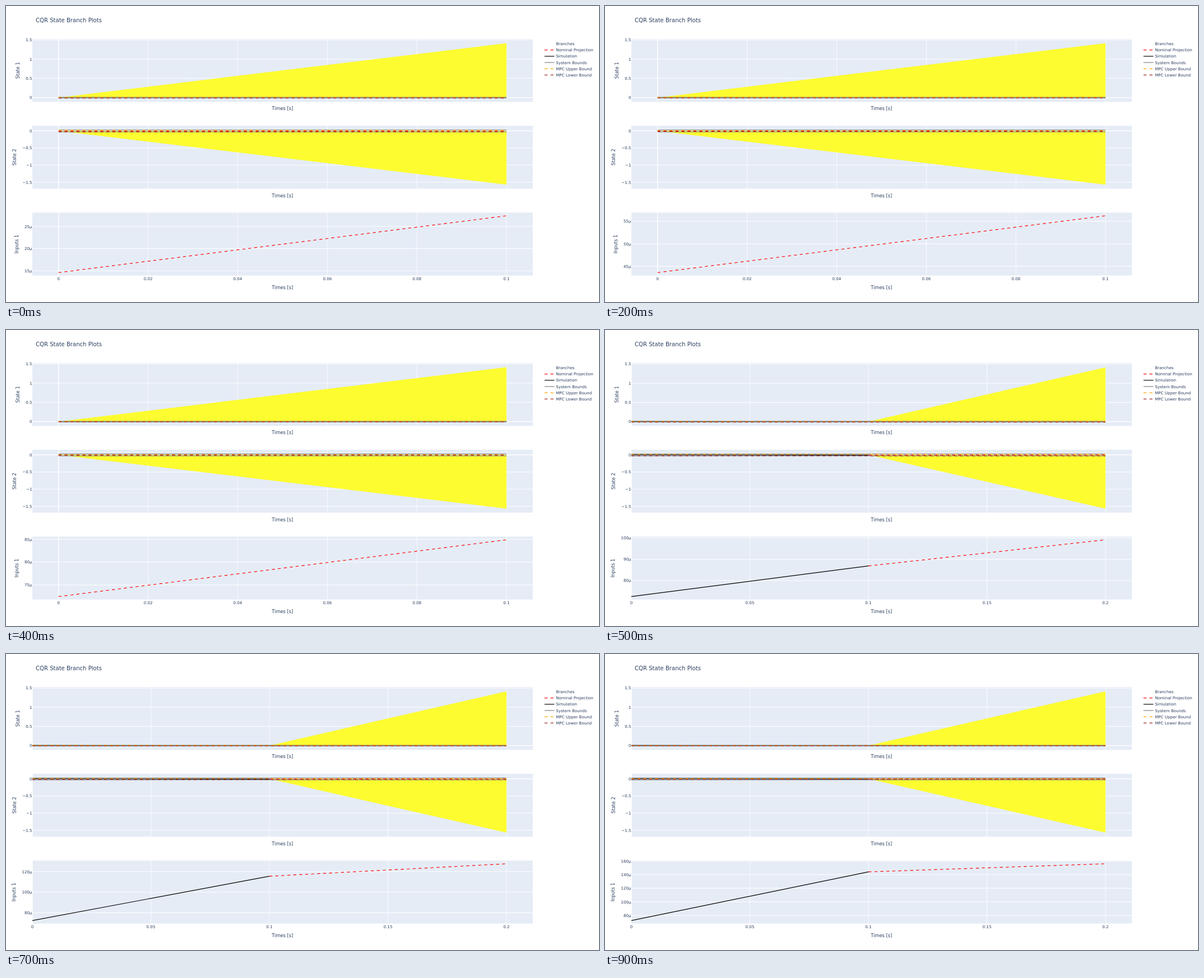
These frames come from a looping animation (1058 by 529 pixels, 1000 ms). An HTML page:

```html
<!DOCTYPE html>
<html lang="en">
<head>
<meta charset="utf-8">
<style>
html, body { margin: 0; height: 100%; overflow: hidden; background: #fff; }
svg { display: block; width: 1058px; height: 529px; }
text { font: 7.1px "DejaVu Sans", Verdana, sans-serif; fill: #2a3f5f; }
.axis { font-size: 8.29px; }
.title { font-size: 10.07px; }
</style>
</head>
<body>
<svg id="stage" viewBox="0 0 1058 529"></svg>
<script>
const stage = document.getElementById('stage');
const LEFT = 47, RIGHT = 940, END = 893;
const COLORS = { nominal: 'red', sim: 'black', system: 'gray', upper: 'orange', lower: 'brown' };

const line = (x1, y1, x2, y2, color, dashed, width = 1.18) =>
  `<path d="M${x1} ${y1}L${x2} ${y2}" stroke="${color}" stroke-width="${width}"` +
  `${dashed ? ' stroke-dasharray="5.33"' : ''}/>`;
const text = (x, y, s, anchor = 'start', cls = '', extra = '') =>
  `<text x="${x}" y="${y}" text-anchor="${anchor}" class="${cls}" ${extra}>${s}</text>`;
const label = n => String(n).replace('-', '−');

function panel(top, name, nameX, xTicks, yTicks, suffix = '') {
  const mid = top + 56.2;
  let out = `<rect x="${LEFT}" y="${top}" width="${RIGHT - LEFT}" height="112.4" fill="#e5ecf6"/>`;
  for (const [v, x] of xTicks)
    out += line(x, top, x, top + 112.4, '#fff', false, v ? 0.8 : 1.4);
  for (const [v, y] of yTicks) {
    out += line(LEFT, y, RIGHT, y, '#fff', false, v ? 1 : 1.4);
    out += text(46.5, y + 2.6, label(v) + suffix, 'end');
  }
  const x = nameX + 3;
  return out + text(x, mid, name, 'middle', 'axis', `transform="rotate(-90 ${x} ${mid})"`);
}

function bounds(x0, start, zero, system, mpc, drift) {
  const flat = (x, dy, color, dashed) => line(x, zero + dy, END, zero + dy, color, dashed);
  let out = line(start, zero + drift, END, zero + drift - 0.4, COLORS.nominal, true);
  if (start > x0) out += line(x0, zero - 0.3, start, zero + drift, COLORS.sim);
  return out + flat(x0, -system, COLORS.system) + flat(x0, system + 0.1, COLORS.system) +
    flat(x0, -mpc, COLORS.upper, true) + flat(x0, mpc + 0.2, COLORS.lower, true);
}

function legend() {
  const items = [['Branches'], ['Nominal Projection', 'nominal', true], ['Simulation', 'sim'],
    ['System Bounds', 'system'], ['MPC Upper Bound', 'upper', true], ['MPC Lower Bound', 'lower', true]];
  return items.map(([name, key, dashed], i) => {
    const y = 67.4 + i * 11.2;
    return (key ? line(960.8, y, 978.4, y, COLORS[key], dashed) : '') + text(981.2, y + 2.6, name);
  }).join('');
}

// Input value in µ at the start of the projection
const input = n => 14.6 + 14.54 * n - 0.0175 * n * n;

function draw(n) {
  const second = n >= 5, phase = n % 5;
  const x0 = second ? LEFT : 93.8;
  const start = second ? 470 : x0;
  const ticks = second ? [0, 0.05, 0.1, 0.15, 0.2] : [0, 0.02, 0.04, 0.06, 0.08, 0.1];
  const xTicks = ticks.map((v, i) => [v, x0 + (END - x0) * i / (ticks.length - 1)]);
  const shift = second ? 0.3 : 0;
  const y1 = v => 163.7 - v * (68.8 - shift / 1.5);
  const y2 = v => 223.2 - v * 61.2;

  const from = input(n), to = from + 12.8 - 0.1 * n;
  const low = second ? input(4) : from;
  const y3 = v => 476.4 - (v - low) / (to - low) * 101.5;
  const rough = (to - low) * 1.11 / 5;
  const step = [5, 10, 20].find(s => s >= rough);
  const yTicks = [];
  for (let v = Math.ceil(low / step) * step; y3(v) > 369.5; v += step) yTicks.push([v, y3(v)]);

  const branches = (zero, end) => `<path d="M${start} ${zero}L${END} ${end}V${zero}Z" fill="#fcfc30"/>`;
  const tight = phase / 4;
  let out = text(53, 29.3, 'CQR State Branch Plots', 'start', 'title') + legend();

  out += panel(59, 'State 1', 21, xTicks, [0, 0.5, 1, 1.5].map(v => [v, y1(v)]));
  out += branches(y1(0), 66.5 + shift) + bounds(x0, start, y1(0), 0.6, 0.7 - 0.4 * tight, 0.4);

  out += panel(214, 'State 2', 15, xTicks, [0, -0.5, -1, -1.5].map(v => [v, y2(v)]));
  out += branches(y2(0), 319.3) + bounds(x0, start, y2(0), 1.6, 1.4 - 0.9 * tight, 0.4);

  out += panel(369.3, 'Inputs 1', second ? 14.3 : 19, xTicks, yTicks, 'μ');
  if (second) out += line(x0, y3(low), start, y3(from), COLORS.sim);
  out += line(start, y3(from), END, y3(to), COLORS.nominal, true);

  for (const y of [186.3, 341.5, 505.7]) out += text(493.3, y, 'Times [s]', 'middle', 'axis');
  for (const [v, x] of xTicks) out += text(x, 489.8, v, 'middle');
  stage.innerHTML = out;
}

let shown = -1;
const begin = performance.now();
function tick() {
  const n = Math.floor((performance.now() - begin) % 1000 / 100);
  if (n !== shown) draw(shown = n);
  requestAnimationFrame(tick);
}
tick();
</script>
</body>
</html>
```
